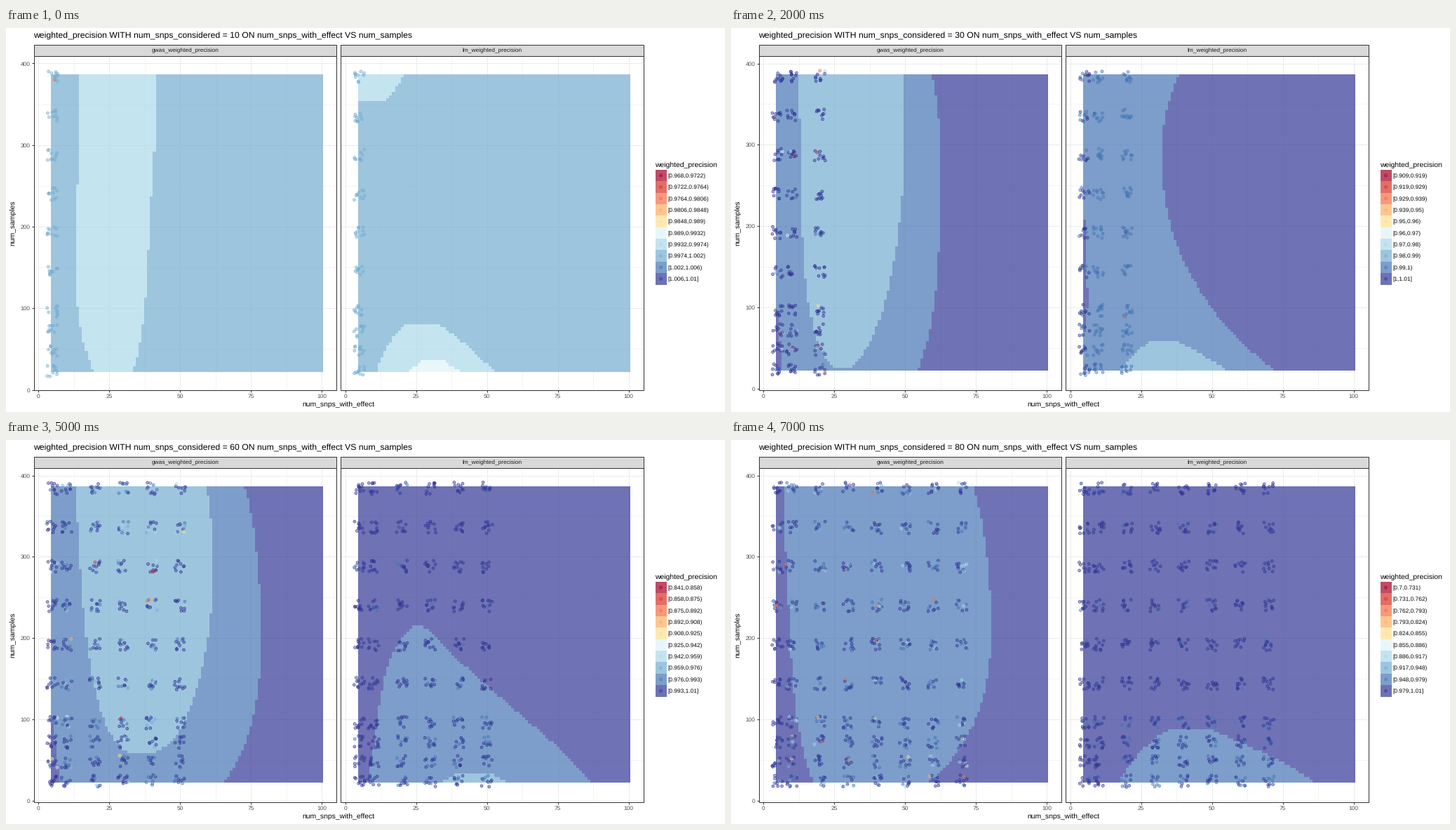
Animation, 1025 px wide and 547 px high, one loop 8000 ms. Source, as a matplotlib script:

```python
import numpy as np
import matplotlib.pyplot as plt
from matplotlib.animation import FuncAnimation
from matplotlib.colors import to_rgb
from matplotlib.patches import Rectangle

plt.rcParams["font.family"] = "Liberation Sans"
plt.rcParams["text.hinting"] = "none"

W, H, DPI = 1025, 547, 100
PX = 72 / DPI
PALETTE = np.array([to_rgb("#" + c) for c in (
    "A50026 D73027 F46D43 FDAE61 FEE090 "
    "E0F3F8 ABD9E9 74ADD1 4575B4 313695").split()])
ALPHA = 0.7
TOP, BOTTOM, LEFT, RIGHT = 39.5, 515.5, 39.5, 471.2
SHIFT = 437.7
EFFECTS = [5, *range(10, 80, 10)]
SAMPLES = [24, 48, 72, *range(96, 400, 48)]
NAMES = ["gwas_weighted_precision", "lm_weighted_precision"]
GREY, DARK, INK = "#EBEBEB", "#333333", "#4D4D4D"
WEST, EAST = [0], [W]

scenes = []


def zone(level, left, right, top=None, bottom=None):
    """Tiles between two smooth edges; edges are x values at even steps."""
    return level, left, right, top, bottom


def scene(low, base, gwas, lm, dots=(), drop=0):
    scenes.append(dict(low=low, base=base, zones=(gwas, lm), dots=dots, drop=drop))


scene(0.968, (7, 7),
      [zone(6, [105, 103.8, 100.8, 101.5, 125], [213.5, 212, 205.5, 199.6, 181])],
      [zone(6, WEST, [538, 550, 567], bottom=104),
       zone(6, [574, 564, 545, 529], [607, 626, 655, 697], top=420),
       zone(5, [603, 595, 586, 570], [615, 623, 633, 653], top=471)],
      [(69, 74, 2)])

scene(0.94, (8, 8),
      [zone(7, [88, 88, 89, 89.8, 110], [243, 246, 239, 230, 206]),
       zone(6, [157, 154, 146, 137], [172, 177, 186, 190], bottom=187)],
      [zone(7, [574, 567, 548.5, 531], [606, 625, 665, 721], top=404.5),
       zone(6, [611], [628], top=484)],
      [(90, 238, 1), (71, 291, 1), (88, 431, 4)])

scene(0.9092, (8, 8),
      [zone(9, [287, 298.5, 298, 291.5, 266], EAST),
       zone(7, [152, 128, 109, 101, 96.5], [168, 193, 222, 243, 247], bottom=484),
       zone(9, WEST, [68, 69, 73], top=405)],
      [zone(9, [639, 614, 626, 673.5, 776], EAST),
       zone(9, WEST, [505, 508, 506], top=275, bottom=435),
       zone(7, [601, 592, 574, 553], [632, 644, 670, 708], top=446)],
      [(90, 183, 0), (122, 177, 2), (561, 411, 2)], 0.1)

scene(0.86, (9, 9),
      [zone(8, [70, 72, 73, 79, 94], [300, 312, 312, 302, 265])],
      [zone(8, [586, 571, 545, 525], [608, 633, 693, 783], top=370)],
      drop=0.28)

scene(0.81, (9, 9),
      [zone(8, [72.5, 74.5, 76.5, 79.5, 98], [306, 321, 321, 309.5, 266])],
      [zone(8, [587, 572, 549, 530], [631, 659, 716, 789], top=391)],
      [(130, 455, 1), (201, 459, 2), (164, 427, 4)], 0.3)

scene(0.8408, (8, 9),
      [zone(9, [340, 358.5, 363.5, 355, 310], EAST),
       zone(7, [180, 151, 126, 110, 100], [198, 242, 273, 294, 286], bottom=446),
       zone(9, WEST, [67, 70, 77], top=405)],
      [zone(8, [581, 566, 545, 530.5, 515], [592, 611, 653, 733, 837], top=266),
       zone(7, [650, 638, 618], [685, 697, 716], top=475)],
      [(127, 174, 1), (211, 187, 1), (164, 396, 1)], 0.33)

scene(0.78, (9, 9),
      [zone(8, [76, 80, 83, 92, 114], [338, 357, 364, 352, 290])],
      [zone(8, [622, 603, 566, 540], [655, 687, 747, 828], top=387)],
      drop=0.33)

scene(0.7, (9, 9),
      [zone(8, [75, 79, 84.5, 93, 118], [346, 365.5, 371, 354.5, 282])],
      [zone(8, [627, 611, 582, 553], [685, 703, 760, 833], top=413)],
      [(208, 285, 0), (163, 340, 2), (330, 425, 4)], 0.33)


def x_px(v):
    return 46 + 4.04 * v


def y_px(v, i):
    return 515.5 - 1.1625 * v if i == 0 else 513.7 - 1.158 * v


def label(x, y, s, size, color="black", **kw):
    ax.text(x, y, s, fontsize=size * PX, color=color, **kw)


def line(xs, ys, color, width=1):
    ax.plot(xs, ys, color=color, lw=width * PX, zorder=1, solid_capstyle="butt")


def box(x, y, w, h, z, **kw):
    ax.add_patch(Rectangle((x, y), w, h, zorder=z, **kw))


def edge(xs, t):
    """Polynomial through xs placed evenly on t = 0..1."""
    n = len(xs)
    return np.polyval(np.polyfit(np.linspace(0, 1, n), xs, n - 1), t)


def tiles(i, p, dx):
    x0, x1 = x_px(4.5) + dx, x_px(100.5) + dx
    y0, y1 = y_px(386.1, i), y_px(22.1, i)
    cols = x0 + (np.arange(96) + 0.5) * (x1 - x0) / 96
    rows = y0 + (np.arange(100) + 0.5) * (y1 - y0) / 100
    grid = np.full((100, 96), scenes[i]["base"][p])
    for level, left, right, top, bottom in scenes[i]["zones"][p]:
        a, b = top or y0, bottom or y1
        t = np.clip((rows - a) / (b - a), 0, 1)
        # a rounded end needs a square-root profile
        if bottom:
            t = np.sqrt(1 - t)
        elif top:
            t = np.sqrt(t)
        inside = ((rows >= a) & (rows <= b))[:, None]
        inside = (inside & (cols > edge(left, t)[:, None])
                  & (cols < edge(right, t)[:, None]))
        grid[inside] = level
    ax.imshow(PALETTE[grid], extent=(x0, x1, y1, y0), alpha=ALPHA, zorder=3,
              interpolation="nearest", aspect="auto", origin="upper")


def markers(x, y, levels):
    color = PALETTE[levels]
    ax.scatter(x, y, s=(3.8 * PX) ** 2, facecolors="none", edgecolors=color,
               linewidths=0.75 * PX, zorder=5)
    ax.scatter(x, y, s=(1.5 * PX) ** 2, c=color, linewidths=0, zorder=5)


def pick_levels(i, p, effect, sample, rng, n):
    u = rng.random(n)
    if i == 0 or (i == 1 and p == 1):
        return np.full(n, 7 + i)
    if p == 1:
        if i == 2:
            return 8 + (u < (0.5 if effect == 5 else 0.03))
        return 9 - (u < (0.35 if sample < 100 and effect > 10 else 0.07))
    drop = scenes[i]["drop"] * (0.5 if effect == 5 else 1)
    levels = min(9, 7 + i) - (u < drop) - (u < drop * 0.4) - (u < drop * 0.15)
    odd = rng.random(n) < 0.025
    return np.where(odd, rng.integers(2, 7, n), levels)


def points(i, p, dx):
    rng = np.random.default_rng(100 * i + p)
    n = 10
    x, y, levels = [], [], []
    for effect in EFFECTS[:i + 1]:
        for sample in SAMPLES:
            x.extend(x_px(effect + rng.uniform(-1.9, 1.9, n)) + dx)
            y.extend(y_px(sample + rng.uniform(-7.5, 7.5, n), i))
            levels.extend(pick_levels(i, p, effect, sample, rng, n))
    markers(x, y, levels)


def draw_panel(i, p):
    dx = p * SHIFT
    x0, x1 = LEFT + dx, RIGHT + dx
    for k in range(9):
        x, y = x_px(12.5 * k) + dx, y_px(50 * k, i)
        width = 0.5 if k % 2 else 1
        line([x, x], [TOP, BOTTOM], GREY, width)
        line([x0, x1], [y, y], GREY, width)
        if k % 2 == 0:
            line([x, x], [BOTTOM, BOTTOM + 3], DARK)
            label(x, 527.2, f"{12.5 * k:.0f}", 8.4, INK, ha="center")
            if p == 0:
                line([LEFT - 3, LEFT], [y, y], DARK)
                label(34.5, y + 3, str(50 * k), 8.4, INK, ha="right")
    tiles(i, p, dx)
    points(i, p, dx)
    box(x0, TOP, x1 - x0, BOTTOM - TOP, 6, fill=False, ec=DARK, lw=PX)
    box(x0, 23.5, x1 - x0, TOP - 23.5, 6, fc="#D9D9D9", ec=DARK, lw=PX)
    label((x0 + x1) / 2, 34.2, NAMES[p], 8.42, "#1A1A1A", ha="center", zorder=7)


def draw_legend(i):
    label(925, 197.6, "weighted_precision", 10.4)
    low, digits, key = scenes[i]["low"], 3 + (i == 0), 16.35
    cuts = [f"{v:.{digits}g}" for v in np.linspace(low, 1.01, 11)]
    mid = 202 + key * (np.arange(10) + 0.5)
    for k, y in enumerate(mid):
        box(925.5, y - key / 2, 16, key, 3, fc=PALETTE[k], alpha=ALPHA, lw=0)
        end = ")" if k < 9 else "]"
        label(943, y + 3, f"[{cuts[k]},{cuts[k + 1]}{end}", 8.42)
    markers(np.full(10, 933.5), mid, np.arange(10))


def draw(i):
    ax.clear()
    ax.axis("off")
    for p in range(2):
        draw_panel(i, p)
    for x, y, level in scenes[i]["dots"]:
        markers([x], [y], [level])
    draw_legend(i)
    label(39, 14.3, f"weighted_precision WITH num_snps_considered = {10 * (i + 1)} "
          "ON num_snps_with_effect VS num_samples", 12.3)
    label(474, 539.2, "num_snps_with_effect", 10.4, ha="center")
    label(9.5, 277.5, "num_samples", 10.4, ha="center", va="center", rotation=90)
    ax.set_xlim(0, W)
    ax.set_ylim(H, 0)
    return []


fig = plt.figure(figsize=(W / DPI, H / DPI), dpi=DPI, facecolor="white")
ax = fig.add_axes([0, 0, 1, 1])
anim = FuncAnimation(fig, draw, frames=len(scenes), interval=1000,
                     init_func=lambda: [], repeat=True, repeat_delay=0)
plt.show()
```
